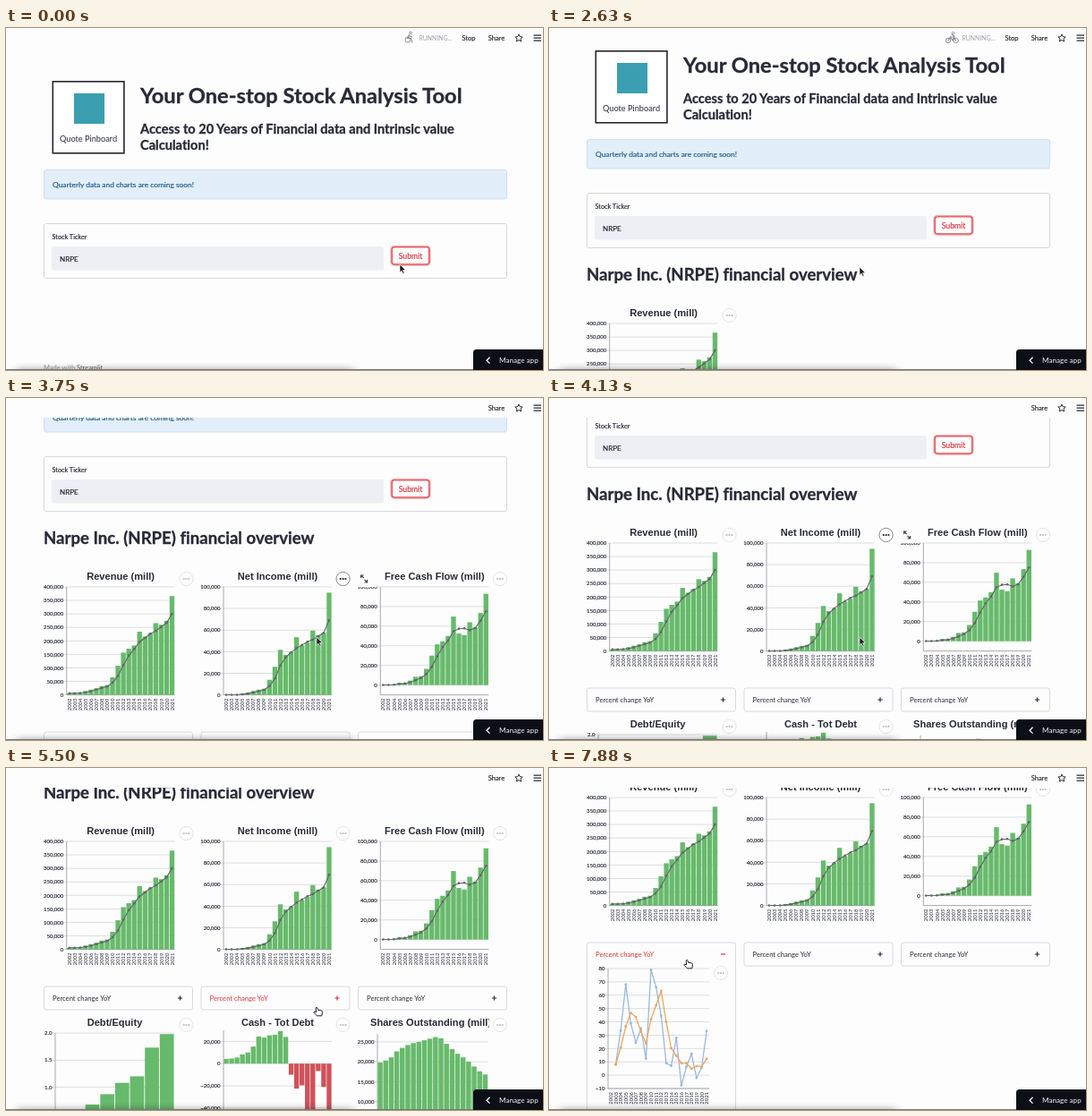
Write an HTML page that moves like this. It is 600 px wide and 382 px high and loops after 8 s.

```html
<!DOCTYPE html>
<html lang="en">
<head>
<meta charset="utf-8">
<title>Stock analysis tool</title>
<style>
  html, body { margin: 0; width: 100%; height: 100%; overflow: hidden; background: #fdfdfe; }
  svg { display: block; width: 600px; height: 382px; font-family: Lato, "Open Sans", sans-serif; font-variant-ligatures: none; }
  .strong { font-weight: 700; stroke: #282a36; stroke-width: .3px; }
  .medium { stroke: currentColor; stroke-width: .18px; }
  .chart-title { font: bold 11.1px "Liberation Sans", Arial, sans-serif; }
</style>
</head>
<body>
<svg id="stage" viewBox="0 0 600 382">
  <defs>
    <clipPath id="titleEdge"><rect x="400" y="550" width="139.5" height="30"/></clipPath>
    <filter id="soft" x="-10%" y="-300%" width="120%" height="700%"><feGaussianBlur stdDeviation="6 3.5"/></filter>
  </defs>
</svg>
<script>
const LOOP = 8000, STEP = 125;
const INK = '#282a36', GREEN = '#67ba6b', RED = '#cf525b', ACCENT = '#d9353c';

const stage = document.getElementById('stage');

function el(tag, attrs, parent, content) {
  const node = document.createElementNS('http://www.w3.org/2000/svg', tag);
  for (const name in attrs) node.setAttribute(name, attrs[name]);
  if (content !== undefined) node.textContent = content;
  return parent.appendChild(node);
}
const group = (parent, attrs = {}) => el('g', attrs, parent);
const label = (parent, x, y, size, content, attrs = {}) =>
  el('text', { x, y, 'font-size': size, fill: INK, ...attrs }, parent, content);
const medium = color => ({ class: 'medium', color, fill: color });
const box = (parent, x, y, width, height, attrs) =>
  el('rect', { x, y, width, height, ...attrs }, parent);
const stroke = (parent, d, color, width = 1, attrs = {}) =>
  el('path', { d, fill: 'none', stroke: color, 'stroke-width': width, ...attrs }, parent);
const show = (node, on) => node.setAttribute('display', on ? 'inline' : 'none');
const move = (node, x, y) => node.setAttribute('transform', `translate(${x} ${y})`);

// Trailing mean over up to three years
const smooth = data => data.map((_, i) => {
  const part = data.slice(Math.max(0, i - 2), i + 1);
  return part.reduce((a, b) => a + b) / part.length;
});
const thousands = v => (v < 0 ? '−' : '') + (v ? Math.abs(v) + ',000' : '0');

function axes(parent, c) {
  const band = (c.right - c.left) / c.years;
  const y = v => c.bottom - (v - c.min) / (c.max - c.min) * (c.bottom - c.top);
  const x = i => c.left + band * (i + .5);
  for (let v = Math.ceil(c.min / c.step) * c.step; v <= c.max; v += c.step) {
    stroke(parent, `M${c.left - 3} ${y(v)}H${c.right}`, '#d6d6d8', .8);
    label(parent, c.left - 3.5, y(v) + 2.2, 6, c.format(v), { 'text-anchor': 'end', ...medium(INK) });
  }
  for (let i = 0; i < c.years; i++) {
    label(parent, 0, 0, 5.9, 2022 - c.years + i, {
      'text-anchor': 'end', transform: `translate(${x(i) + 2.1} ${c.bottom + 4}) rotate(-90)`
    });
  }
  stroke(parent, `M${c.left} ${c.top}V${c.bottom}H${c.right}`, '#96969a', .8);
  return { x, y, band };
}

function plotLine(parent, values, x, y, color, width, dot) {
  stroke(parent, 'M' + values.map((v, i) => `${x(i)} ${y(v)}`).join('L'), color, width);
  values.forEach((v, i) => el('circle', { cx: x(i), cy: y(v), r: dot, fill: color }, parent));
}

function menu(parent, x, y, dark) {
  const g = group(parent);
  el('circle', { cx: x, cy: y, r: 7.6, fill: '#fff', stroke: dark ? '#8a8b90' : '#e4e4e8', 'stroke-width': 1 }, g);
  for (const dx of [-2.8, 0, 2.8])
    el('circle', { cx: x + dx, cy: y, r: 1.1, fill: dark ? '#222' : '#bcbdc2' }, g);
}

function chart(parent, c) {
  c = { min: 0, format: thousands, years: c.data.length, ...c };
  const g = group(parent);
  const { x, y, band } = axes(g, c);
  const width = band - Math.min(.9, band * .11);
  c.data.forEach((v, i) => box(g, x(i) - width / 2, Math.min(y(0), y(v)), width, Math.abs(y(v) - y(0)),
    { fill: v < 0 ? RED : GREEN }));
  if (c.trend) plotLine(g, smooth(c.data), x, y, '#626466', 1.1, 1.3);
  label(c.clip ? group(g, { 'clip-path': 'url(#titleEdge)' }) : g,
    c.center || (c.left + c.right) / 2, c.titleY, 11.1, c.title,
    { class: 'chart-title', 'text-anchor': 'middle' });
  menu(g, c.menuX, c.titleY - 1, false);
  return g;
}

// Dark menu and full-screen control for a hovered chart
function hoverTools(parent, x, y) {
  const g = group(parent);
  menu(g, x, y, true);
  box(g, x + 15, y - 9, 23, 18.2, { fill: '#fdfdfe' });
  stroke(g, `M${x + 20} ${y - 1}v-3h3M${x + 20} ${y - 4}l3 3M${x + 27} ${y + 1}v3h-3M${x + 27} ${y + 4}l-3-3`, '#44464f', 1.2);
  return g;
}

function expander(parent, x, width) {
  const g = group(parent);
  const frame = box(g, x, 526, width, 26, { rx: 2.5, fill: '#fdfdfe', stroke: '#d8d9de' });
  const name = label(g, x + 9.5, 541.7, 7.65, 'Percent change YoY');
  const sign = stroke(g, '', INK, 1.2);
  return (red, open, height = 26) => {
    const cx = x + width - 14;
    frame.setAttribute('height', height);
    name.setAttribute('fill', red ? ACCENT : INK);
    sign.setAttribute('stroke', red ? ACCENT : INK);
    sign.setAttribute('d', `M${cx - 2.6} 539h5.2` + (open ? '' : `M${cx} 536.4v5.2`));
  };
}

// Page
const page = group(stage);
box(page, 52.3, 59.8, 79.6, 80, { fill: '#fff', stroke: '#25262b', 'stroke-width': 1.6 });
box(page, 76, 73, 34, 34, { fill: '#3b9fb1' });
label(page, 92, 127, 9.2, 'Quote Pinboard', { 'text-anchor': 'middle' });
label(page, 150, 84, 23.7, 'Your One-stop Stock Analysis Tool', { class: 'strong' });
label(page, 150, 118, 14.6, 'Access to 20 Years of Financial data and Intrinsic value', { class: 'strong' });
label(page, 150, 136.2, 14.6, 'Calculation!', { class: 'strong' });
box(page, 42.5, 158.5, 517, 32.5, { rx: 2.5, fill: '#e2eefa', stroke: '#cbe0f0' });
label(page, 52, 177.8, 8.4, 'Quarterly data and charts are coming soon!', medium('#1f5c80'));
box(page, 42.5, 218.5, 517, 61, { rx: 2.5, fill: 'none', stroke: '#d6d7dc' });
label(page, 51.5, 235.6, 7.3, 'Stock Ticker', medium(INK));
box(page, 51, 244, 371, 26.5, { rx: 2.5, fill: '#eeeff4' });
label(page, 60, 260.5, 8.1, 'NRPE', medium(INK));
box(page, 431, 244.5, 42, 19.6, { rx: 3, fill: '#fff', stroke: '#f2a3a6', 'stroke-width': 3.2 });
box(page, 431.3, 244.8, 41.4, 19, { rx: 2.5, fill: '#fff', stroke: '#dc5459', 'stroke-width': 1.3 });
label(page, 452, 257.8, 8.7, 'Submit', { 'text-anchor': 'middle', ...medium(ACCENT) });

const footer = label(page, 42, 381.5, 7.5, 'Made with ', { fill: '#97989e' });
el('tspan', { fill: '#63646c' }, footer, 'Streamlit');

const heading = label(page, 42, 315.8, 18.6, 'Narpe Inc. (NRPE) financial overview', { class: 'strong' });
const anchor = group(page, { transform: 'translate(27 309) rotate(-35)' });
for (const x of [-4.6, -.6]) box(anchor, x, -1.9, 5.2, 3.8, { rx: 1.9, fill: 'none', stroke: '#85868d', 'stroke-width': 1 });

const topRow = { top: 364, bottom: 484.6, titleY: 356, trend: true };
const revenue = chart(page, { ...topRow, title: 'Revenue (mill)', left: 67.7, right: 188.5, menuX: 201.5, max: 400, step: 50,
  data: [5.7, 6.2, 8.3, 13.9, 19.3, 24.6, 32.5, 36.5, 65.2, 108, 156.5, 171, 183, 234, 216, 229, 266, 260, 274.5, 366] });
const rest = group(page);
chart(rest, { ...topRow, title: 'Net Income (mill)', left: 243, right: 364, menuX: 376.6, max: 100, step: 20,
  data: [.07, .06, .3, 1.3, 2, 3.5, 4.8, 5.7, 14, 26, 41.7, 37, 39.5, 53.4, 45.7, 48.4, 59.5, 55.3, 57.4, 94.7] });
chart(rest, { ...topRow, title: 'Free Cash Flow (mill)', left: 418.3, right: 539.3, menuX: 552, min: -10, max: 100, step: 20,
  data: [.1, .1, .8, 2.3, 1.6, 4.5, 8.4, 9, 16.5, 30, 41.5, 44.6, 50, 69.8, 52.5, 51, 64, 59, 73.4, 93] });

const lower = group(rest);
const lowRow = { top: 578, bottom: 699, titleY: 570 };
chart(lower, { ...lowRow, title: 'Debt/Equity', left: 55, right: 188, menuX: 201.5, max: 2, step: .5,
  format: v => v.toFixed(1), data: [.32, .55, .68, .87, 1.08, 1.2, 1.73, 1.98] });
chart(lower, { ...lowRow, title: 'Cash - Tot Debt', left: 243, right: 364, menuX: 376.6, top: 575, min: -70, max: 30, step: 20,
  data: [4.3, 4.6, 5.5, 8.3, 10, 15.4, 24.5, 23.5, 25.5, 26, 29.3, 24, -10, -22.5, -19.5, -41, -48, -6.7, -21, -62] });
chart(lower, { ...lowRow, title: 'Shares Outstanding (mill)', left: 415, right: 538.5, center: 474.5, clip: true, menuX: 552,
  top: 579, max: 27, step: 5,
  data: [19.8, 20.3, 21.1, 22.6, 23.5, 24.2, 24.7, 25, 25.4, 25.8, 26.2, 25.9, 24.5, 23.2, 22, 21.1, 20, 18.8, 17.6, 16.8] });

const expanders = [[42.5, 166], [218, 166], [393.5, 166]].map(([x, w]) => expander(rest, x, w));

const growth = group(rest);
{
  const { x, y } = axes(growth, { left: 66, right: 179, top: 555, bottom: 689, min: -10, max: 80, step: 10, years: 20,
    format: v => String(v).replace('-', '−') });
  const rates = [8, 33.5, 68, 38.7, 24.3, 35, 12.4, 79, 66, 44.6, 9, 7, 28, -7.7, 6.3, 16, -2, 5.5, 33.3];
  const fromSecond = i => x(i + 1);
  plotLine(growth, rates, fromSecond, y, '#9bb9de', 1.3, 1.4);
  plotLine(growth, smooth(rates), fromSecond, y, '#eda75f', 1.3, 1.4);
  menu(growth, 192, 560, false);
}

const hovers = [
  { from: 3000, to: 5250, node: hoverTools(page, 376.6, 355) },
  { from: 6250, to: 6875, node: hoverTools(page, 376.6, 569) }
];

// Fixed header, bottom edge and corner button
box(stage, 0, 0, 600, 22, { fill: '#fdfdfe' });
const status = group(stage);
const poses = [
  ['M450.5 7.5l-2 4h4l1.5 4.5M450 8.5l3.5 1.5', [452, 5.2, 1.2], [449, 13.2, 3]],
  ['M446 14l2.5-4h4l2 4M448.5 10l2.5 4 2-5-3-2', [451.5, 5.6, 1.2], [446, 14, 2.7], [454.6, 14, 2.7]],
  ['M445 8.6h10M450 8.6v4l-2 5M450 12.6l2 5', [450, 5.6, 1.3]],
  ['M446 10l3-2.5 3 1.5 3 1M450 8.5l-1 4 3 2v3M449 12l-1 3h-3', [452, 5.6, 1.2]],
  ['M445 15h10M446 12l3-3 4 1 1 3', [452, 6.6, 1.2]]
].map(([d, ...circles]) => {
  const g = group(status);
  stroke(g, d, '#8e8f95', 1.2, { 'stroke-linecap': 'round' });
  circles.forEach(([cx, cy, r]) => el('circle', { cx, cy, r, fill: 'none', stroke: '#8e8f95', 'stroke-width': 1 }, g));
  return g;
});
label(status, 461.5, 13.9, 6.9, 'RUNNING...', { fill: '#a2a3a9' });
label(status, 509.5, 13.9, 7.5, 'Stop', medium(INK));
label(stage, 538.7, 13.9, 7.5, 'Share', medium(INK));
const star = Array.from({ length: 10 }, (_, i) => {
  const r = i % 2 ? 2.1 : 4.4, a = i * Math.PI / 5;
  return `${573 + r * Math.sin(a)} ${11.4 - r * Math.cos(a)}`;
}).join('L');
stroke(stage, `M${star}Z`, INK, 1, { 'stroke-linejoin': 'round' });
stroke(stage, 'M589.5 8.2h8.5M589.5 11.2h8.5M589.5 14.2h8.5', INK, 1.2);
box(stage, 12, 380, 376, 12, { fill: '#000', opacity: .3, filter: 'url(#soft)' });
stroke(stage, 'M0 381.5H600', '#77787c', 1);
el('path', { d: 'M522 382V362.5q0-3.5 3.5-3.5H600V382Z', fill: '#0d0f17' }, stage);
stroke(stage, 'M540.5 367.8l-3.4 3.4 3.4 3.4', '#fff', 1.3);
label(stage, 551, 374, 8.15, 'Manage app', { fill: '#f4f4f6' });

// Pointers, with their hot spot at the origin
const arrow = el('path', { d: 'M0 0V9.2L2.1 7.2 3.6 10.5 5.1 9.8 3.6 6.6H6.5Z',
  fill: '#111', stroke: '#fff', 'stroke-width': .7 }, stage);
const hand = el('path', { d: 'M-1.8-4.2q1.2-1 1.8.3l.7 2.2 3.4.6q1.6.3 1.4 1.9l-.7 4H-.6L-4 1.2q-.3-1.4 1.1-1l1.5.8Z',
  fill: '#fff', stroke: '#222', 'stroke-width': 1 }, stage);

// Rows of time and values, joined by straight lines
function at(keys, t) {
  const i = keys.findIndex(key => key[0] > t);
  if (i < 0) return keys[keys.length - 1].slice(1);
  if (!i) return keys[0].slice(1);
  const a = keys[i - 1], b = keys[i], p = (t - a[0]) / (b[0] - a[0]);
  return a.slice(1).map((v, n) => v + (b[n + 1] - v) * p);
}
const scrollKeys = [[2250, 0], [2625, 34], [3375, 104], [4125, 202], [4875, 237], [6125, 326], [7625, 326], [7875, 331]];
const pointerKeys = [[1000, 440, 264], [2125, 347, 267], [5375, 347, 267], [5500, 348, 272], [6375, 348, 272],
  [7000, 190, 232], [7500, 155, 219]];

function draw(t) {
  const [scroll] = at(scrollKeys, t);
  const [px, py] = at(pointerKeys, t);
  move(page, 0, -Math.round(scroll));

  show(footer, t < 2125);
  show(heading, t >= 2125);
  show(anchor, t >= 2750 && t < 3625);
  show(revenue, t >= 2500);
  show(rest, t >= 2750);
  hovers.forEach(h => show(h.node, t >= h.from && t < h.to));

  const height = t < 7750 ? 26 : t < 7875 ? 110 : 260;
  expanders[0](t >= 7125, t >= 7750, height);
  expanders[1](t >= 5500 && t < 6250, false);
  expanders[2](false, false);
  move(lower, 0, height - 26);
  show(growth, t >= 7875);

  status.setAttribute('opacity', t < 3250 ? 1 : t < 3500 ? .6 : 0);
  poses.forEach((pose, i) => show(pose, i === t / STEP % poses.length));

  const pointing = t >= 5500 && t < 6250 || t >= 7125;
  show(arrow, !pointing);
  show(hand, pointing);
  move(pointing ? hand : arrow, px, py);
}

const start = performance.now();
function tick() {
  draw(Math.floor((performance.now() - start) % LOOP / STEP) * STEP);
  requestAnimationFrame(tick);
}
tick();
</script>
</body>
</html>
```
